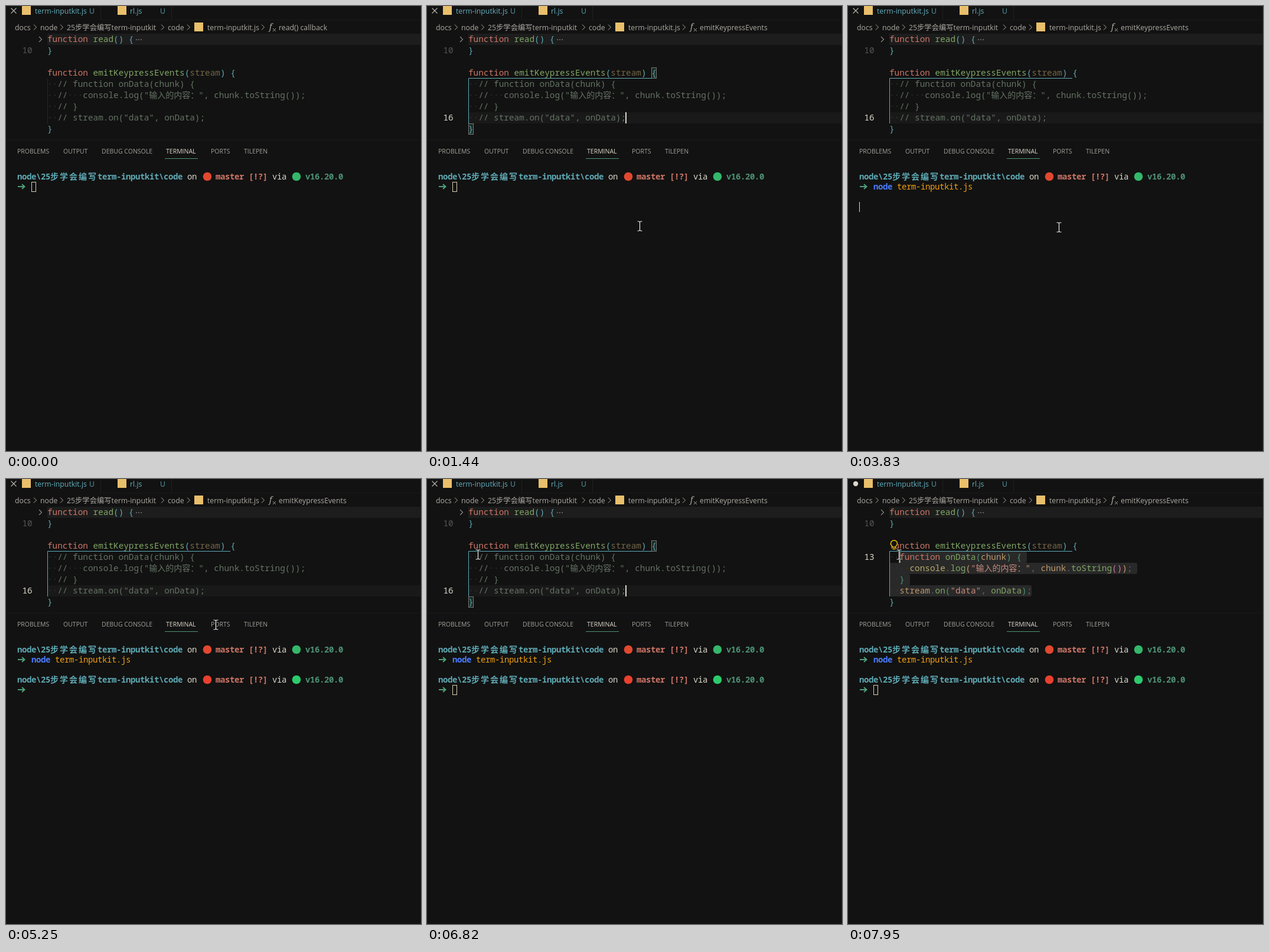
An HTML page for the animation above (8 s loop, 703x754 px).

```html
<!DOCTYPE html>
<html lang="zh">
<head>
<meta charset="utf-8">
<title>Terminal demo</title>
<style>
  html, body { margin: 0; width: 100%; height: 100%; overflow: hidden; background: #121212; }
  svg { display: block; width: 100vw; height: 100vh; }
  text { white-space: pre; }
  .ui { font: 12.3px "Open Sans", "Noto Sans CJK SC", "Noto Sans CJK", sans-serif; }
  .panel { font: 10.5px "Open Sans", sans-serif; }
  .code { font: 14.36px "Noto Sans Mono", "Noto Sans CJK SC", "Noto Sans CJK", monospace; }
  .term { font: 14px "Noto Sans Mono", "Noto Sans CJK SC", "Noto Sans CJK", monospace; letter-spacing: -0.4px; }
  .bold { font-weight: 700; }
  .cjk { font-family: "Noto Sans CJK SC", "Noto Sans CJK", sans-serif; font-size: 14px; }
  .wide { letter-spacing: 2px; }
  .fx { font: italic 14px "Noto Serif", serif; }
</style>
</head>
<body>
<svg id="stage" viewBox="0 0 703 754"></svg>
<script>
const LOOP = 8000;
const BG = '#121212', EDGE = '#1f1f1f', LIGHT = '#dbd7ca', GREY = '#adaba4';
const KEY = '#cf7667', FUNC = '#80a665', VAR = '#bd976a', STR = '#c98a7d', OBJ = '#b8a965';
const PUNC = '#666666', NOTE = '#647364', SPACE = '#343434', FADED = '#746646';
const B1 = '#5eaab5', B2 = '#4d9375', B3 = '#d4976c', B4 = '#d9739f';
const TAB = '#63b0bf', BADGE = '#559ba7';
const BLUE = '#4a7dff', ORANGE = '#f0a010', HINT = '#777777', SCRIPT = '#e9bf6b';
const FILE = 'term-inputkit.js', COMMAND = 'node ' + FILE;
const FOLDER = '25步学会编写term-inputkit';

const stage = document.getElementById('stage');

function add(tag, attrs, parent = stage) {
  const el = document.createElementNS('http://www.w3.org/2000/svg', tag);
  for (const name in attrs) el.setAttribute(name, attrs[name]);
  parent.appendChild(el);
  return el;
}
const group = () => add('g', {});
const rect = (x, y, width, height, fill, parent, rx = 0) =>
  add('rect', { x, y, width, height, fill, rx }, parent);
const line = (d, stroke, parent, width = 1) =>
  add('path', { d, stroke, 'stroke-width': width, fill: 'none' }, parent);
const dot = (cx, cy, r, fill, parent) => add('circle', { cx, cy, r, fill }, parent);

function text(x, y, str, fill, cls, parent) {
  const el = add('text', { x, y, fill, class: cls }, parent);
  el.textContent = str;
  return el;
}
function show(el, on) {
  el.setAttribute('visibility', on ? 'visible' : 'hidden');
}

// Editor rows are 19 px apart; row 0 is the folded function.
const rowTop = row => 47 + 19 * row;
const baseline = row => rowTop(row) + 14;
function code(row, runs, parent) {
  const el = add('text', { x: 70, y: baseline(row), class: 'code' }, parent);
  for (const [str, fill, cls = ''] of runs) {
    add('tspan', { fill, class: cls }, el).textContent = str;
  }
  return el;
}
const lineNumber = (row, str, fill) => text(27.5, baseline(row), str, fill, 'code');

// Terminal cells are 8 by 17 px.
const cellX = n => 19 + 8 * n;
const cellTop = row => 281 + 17 * row;
const cell = (n, row, str, fill, cls = '', parent) =>
  text(cellX(n), cellTop(row) + 13, str, fill, 'term ' + cls, parent);

function prompt(row, red, green, parent) {
  const mid = cellTop(row) + 8;
  cell(0, row, 'node\\25', B1, 'bold', parent);
  cell(7, row, '步学会编写', B1, 'bold cjk wide', parent);
  cell(17, row, 'term-inputkit\\code', B1, 'bold', parent);
  cell(36, row, 'on', LIGHT, '', parent);
  dot(341, mid, 7.3, red, parent);
  cell(42, row, 'master', KEY, 'bold', parent);
  cell(49, row, '[!?]', KEY, 'bold', parent);
  cell(54, row, 'via', LIGHT, '', parent);
  dot(492, mid, 7.3, green, parent);
  cell(61, row, 'v16.20.0', B2, 'bold', parent);
  line(`M20,${mid + 17}h11M27,${mid + 13}l4.5,4l-4.5,4`, '#4fa07c', parent, 2);
}
const hollow = row => add('rect', {
  x: 43.5, y: cellTop(row) + 0.5, width: 7, height: 16, fill: 'none', stroke: '#d9cfb4'
});

rect(0, 0, 703, 754, BG);

// Tabs
rect(160, 0, 1, 24, EDGE);
rect(280, 0, 1, 24, EDGE);
rect(161, 23, 542, 1, '#191919');
const closeMark = line('M8.5,3.5l9,9M17.5,3.5l-9,9', '#b5b3aa', stage, 1.2);
const dirtyMark = dot(13, 8, 4.2, LIGHT);
rect(27, 0, 15, 15, SCRIPT);
text(49, 13, FILE, TAB, 'ui');
text(141, 13, 'U', BADGE, 'ui');
rect(189, 0, 15, 15, SCRIPT);
text(210, 13, 'rl.js', TAB, 'ui');
text(261, 13, 'U', BADGE, 'ui');

// Breadcrumbs
text(15, 41, 'docs', GREY, 'ui');
text(58, 41, 'node', GREY, 'ui');
text(103, 41, FOLDER, GREY, 'ui');
text(274, 41, 'code', GREY, 'ui');
rect(319, 28, 15, 15, SCRIPT);
text(341, 41, FILE, GREY, 'ui');
for (const x of [47, 92, 263, 307, 433]) line(`M${x},31.5l4.5,4.5l-4.5,4.5`, GREY);
text(446, 40, 'f', GREY, 'fx');
line('M452,38l5,5M457,38l-5,5', GREY);
const crumbRead = text(462, 41, 'read() callback', GREY, 'ui');
const crumbEmit = text(462, 41, 'emitKeypressEvents', GREY, 'ui');

// Editor backgrounds
rect(70, rowTop(0), 633, 19, '#1d1d1d');
const activeRow = rect(70, rowTop(7), 633, 19, '#191919');
const selectNotes = group();
const selectCode = group();
function selection(parent, spans) {
  spans.forEach(([from, to], i) => rect(from, rowTop(4 + i), to - from, 19, '#292929', parent, 3));
}
selection(selectNotes, [[87, 329], [70, 516], [70, 131], [70, 337]]);
selection(selectCode, [[87, 303], [70, 490], [70, 105], [70, 311]]);

const brackets = group();
for (const [x, y] of [[380.5, 104.5], [70.5, 199.5]]) {
  add('rect', { x, y, width: 8, height: 18, fill: '#1b2721', stroke: '#777d77' }, brackets);
}
const plainGuide = line('M70.5,123V199', '#262626');
const activeGuide = line('M380,122.5H70.5V199', B1);

// Editor text
line('M56,52l4.5,4.5l-4.5,4.5', '#8a8a85', stage, 1.2);
code(0, [['function ', KEY], ['read', FUNC], ['() {', B1]]);
for (const x of [221, 225, 229]) dot(x, 57, 1, '#777777');
lineNumber(1, '10', '#555555');
code(1, [['}', B1]]);
code(3, [['function ', KEY], ['emitKeypressEvents', FUNC], ['(', B1], ['stream', FADED], [') {', B1]]);
code(8, [['}', B1]]);
const line16 = lineNumber(7, '16', LIGHT);
const line13 = lineNumber(4, '13', LIGHT);

const notes = group();
code(4, [['··', SPACE], ['// function onData(chunk) {', NOTE]], notes);
code(5, [['··', SPACE], ['//', NOTE], ['···', SPACE], ['console.log("', NOTE],
  ['输入的内容：', NOTE, 'cjk'], ['", chunk.toString());', NOTE]], notes);
code(6, [['··', SPACE], ['// }', NOTE]], notes);
code(7, [['··', SPACE], ['// stream.on("data", onData);', NOTE]], notes);

const live = group();
code(4, [['··', SPACE], ['function ', KEY], ['onData', FUNC], ['(', B2], ['chunk', VAR], [') {', B2]], live);
const logRow = code(5, [['····', SPACE], ['console', OBJ], ['.', PUNC], ['log', FUNC], ['(', B3], ['"', STR],
  ['输入的内容：', STR, 'cjk'], ['"', STR], [', ', PUNC], ['chunk', VAR], ['.', PUNC], ['toString', FUNC],
  ['()', B4], [')', B3], [';', PUNC]], live);
code(6, [['··', SPACE], ['}', B2]], live);
const onRow = code(7, [['··', SPACE], ['stream', VAR], ['.', PUNC], ['on', FUNC], ['(', B2], ['"data"', STR],
  [', ', PUNC], ['onData', FUNC], [')', B2], [';', PUNC]], live);
const consoleWord = logRow.children[1], handlerWord = onRow.children[7];

const caret16 = rect(336, rowTop(7), 2, 19, LIGHT);
const caret13 = rect(86.5, rowTop(4), 2, 19, LIGHT);
const bulb = group();
add('path', {
  d: 'M75.5,115.5c0,-2 -3,-3 -3,-6a5.5,5.5 0 0 1 11,0c0,3 -3,4 -3,6z',
  fill: BG, stroke: '#ffcc00', 'stroke-width': 1.4
}, bulb);
line('M75.5,118.5h5', '#ffcc00', bulb, 1.6);

// Panel
rect(0, 227, 703, 1, '#191919');
[[19, 'PROBLEMS'], [97, 'OUTPUT'], [162, 'DEBUG CONSOLE'], [271, 'TERMINAL'], [347, 'PORTS'], [403, 'TILEPEN']]
  .forEach(([x, name]) => text(x, 250, name, name === 'TERMINAL' ? LIGHT : '#a3a19a', 'panel'));
rect(269, 258, 56, 1, B2);
rect(702, 0, 1, 754, '#1a1a1a');

// Terminal
prompt(0, '#e0482f', '#34b76a', stage);
const secondPrompt = group();
prompt(3, '#e8402f', '#2bcb6c', secondPrompt);
const typed = cell(3, 1, '', BLUE, 'bold');
const rest = cell(3, 1, '', HINT);
const hollowFirst = hollow(1), hollowLast = hollow(4);
const bar = rect(0, 0, 1, 17, LIGHT);

// Mouse
const mouse = group();
const beam = 'M-3.5,-8h2.5l1.5,1l1.5,-1h2.5M0.5,-7V7M-3.5,8h2.5l1.5,-1l1.5,1h2.5';
line(beam, '#000000', mouse, 2.4);
line(beam, '#ffffff', mouse, 1.2);

const CLICK_EDITOR = 1040, CLICK_TERMINAL = 1640, CLICK_BACK = 5760;
const SELECT = 7090, BULB = 7280, UNCOMMENT = 7620, RECOLOR = 7950;
const KEYS = [2040, 2240, 2370, 2570, 2630];
const ACCEPT = 3370, ENTER = 3630, BLANK = 3830, DONE = 4290;

const path = [
  [130, 638, 708], [520, 470, 420], [900, 352, 201], [1040, 363, 214], [1100, 363, 214],
  [1440, 360, 373], [1640, 357, 375], [5110, 357, 375], [5250, 355, 247], [5760, 366, 190],
  [6000, 370, 189], [6420, 115, 143], [6560, 113, 142], [6690, 80, 131], [6820, 86, 128]
];
function mouseAt(t) {
  const i = path.findIndex(p => p[0] > t);
  if (i < 0) return path[path.length - 1].slice(1);
  const [t0, x0, y0] = path[i - 1], [t1, x1, y1] = path[i];
  const k = (t - t0) / (t1 - t0);
  return [x0 + (x1 - x0) * k, y0 + (y1 - y0) * k].map(Math.round);
}
const within = (t, from, to) => t >= from && t < to;
const blink = (age, period) => Math.floor(age / period) % 2 === 0;

function barAt(t, count) {
  if (t >= DONE) return [3, 4];
  if (t >= BLANK) return [0, 3];
  if (t >= ENTER) return [0, 2];
  return [3 + (t >= ACCEPT ? COMMAND.length : count), 1];
}

function drawEditor(t) {
  const seen = t >= CLICK_EDITOR, selected = t >= SELECT, edited = t >= UNCOMMENT;
  const focused = within(t, CLICK_EDITOR, CLICK_TERMINAL) || t >= CLICK_BACK;
  const focusStart = t >= CLICK_BACK ? CLICK_BACK : CLICK_EDITOR;
  show(crumbRead, !seen);
  show(crumbEmit, seen);
  show(plainGuide, !seen);
  show(activeGuide, seen);
  show(activeRow, seen && !selected);
  show(line16, seen && !selected);
  show(line13, selected);
  show(brackets, focused && !selected);
  show(caret16, focused && !selected && blink(t - focusStart, 530));
  show(caret13, selected);
  show(bulb, t >= BULB);
  show(selectNotes, selected && !edited);
  show(selectCode, edited);
  show(notes, !edited);
  show(live, edited);
  show(closeMark, !edited);
  show(dirtyMark, edited);
  consoleWord.setAttribute('fill', t >= RECOLOR ? OBJ : VAR);
  handlerWord.setAttribute('fill', t >= RECOLOR ? FUNC : VAR);
}

function drawTerminal(t) {
  const count = KEYS.filter(k => k <= t).length;
  typed.textContent = COMMAND.slice(0, count);
  typed.setAttribute('fill', count < 4 ? KEY : BLUE);
  rest.textContent = count ? COMMAND.slice(count) : '';
  rest.setAttribute('x', cellX(3 + count));
  rest.setAttribute('fill', t >= ACCEPT ? ORANGE : HINT);
  show(secondPrompt, t >= DONE);
  show(hollowFirst, t < CLICK_TERMINAL);
  show(hollowLast, t >= CLICK_BACK);
  const [n, row] = barAt(t, count);
  bar.setAttribute('x', cellX(n));
  bar.setAttribute('y', cellTop(row));
  const off = within(t, 3240, ACCEPT) || within(t, 4910, 5510);
  show(bar, within(t, CLICK_TERMINAL, CLICK_BACK) && !off);
}

function draw(t) {
  drawEditor(t);
  drawTerminal(t);
  show(mouse, t >= path[0][0]);
  if (t >= path[0][0]) mouse.setAttribute('transform', `translate(${mouseAt(t)})`);
}

const start = performance.now();
function tick() {
  draw((performance.now() - start) % LOOP);
  requestAnimationFrame(tick);
}
tick();
</script>
</body>
</html>
```
